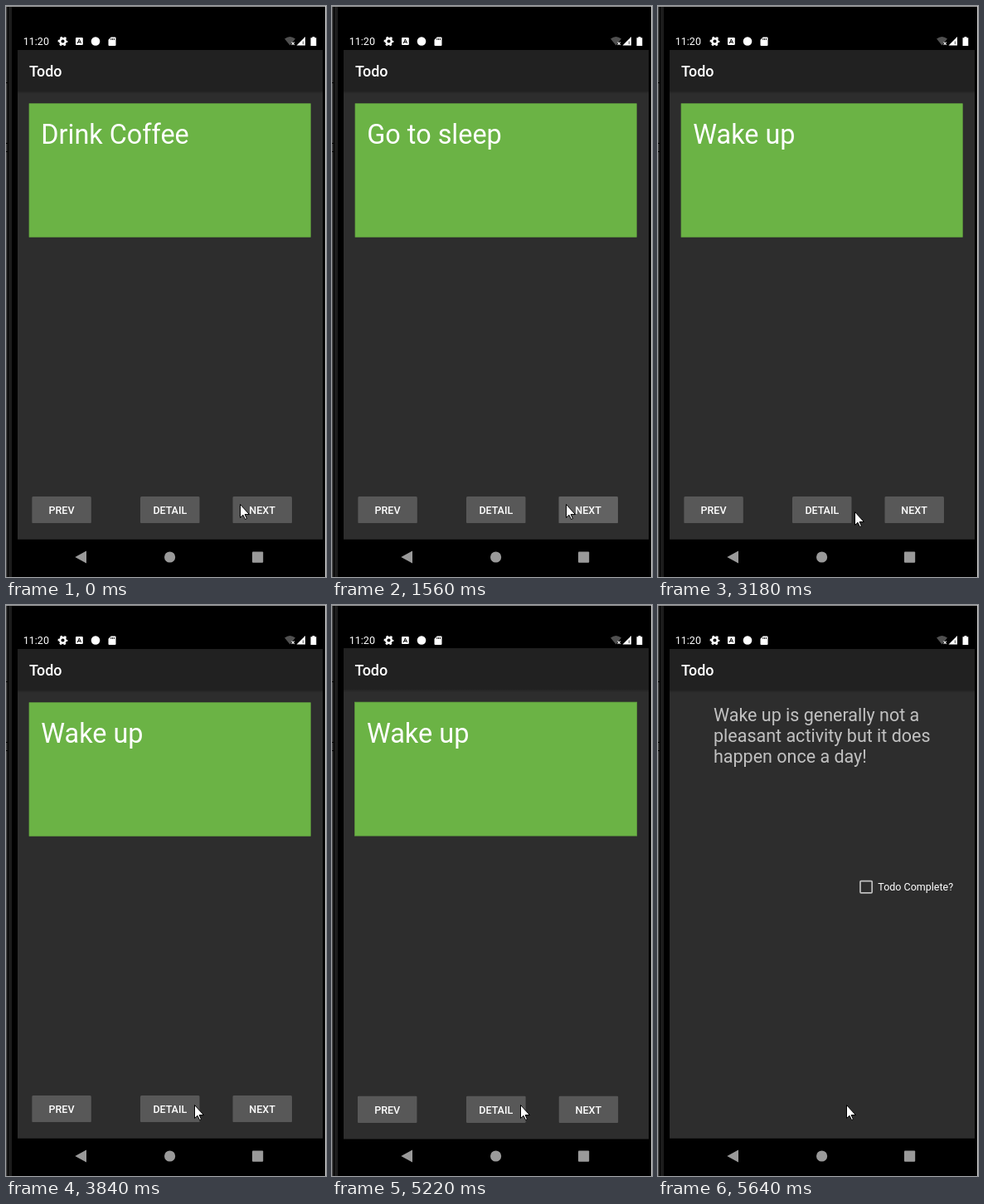
Animation, 386 px wide and 688 px high, one loop 8000 ms. Source, as an HTML page:

```html
<!DOCTYPE html>
<html lang="en">
<head>
<meta charset="utf-8">
<title>Todo</title>
<style>
  html, body { margin: 0; width: 100%; height: 100%; overflow: hidden; background: #000; }
  #stage { display: block; width: 386px; height: 688px; font-family: Roboto, sans-serif; fill: #fff; }
  .scale { transform-origin: 198px 359px; }
  .title { font-size: 17.9px; font-weight: 500; }
  .button { font-size: 12.5px; font-weight: 500; text-anchor: middle; }
  .small { font-size: 12.5px; }
  .task { font-size: 32.4px; }
  .detail { font-size: 21.5px; fill: #c1c1c1; }
</style>
</head>
<body>
<svg id="stage" viewBox="0 0 386 688">
  <defs>
    <linearGradient id="shade" x2="0" y2="1">
      <stop offset="0" stop-opacity=".2"/>
      <stop offset="1" stop-opacity="0"/>
    </linearGradient>
    <clipPath id="screen"><path d="M14 31H382V686H14z"/></clipPath>
    <g id="window">
      <path fill="#000" d="M14 31.5H382V686H14z"/>
      <path fill="#2d2d2d" d="M14 53H382V642.700H14z"/>
      <path fill="#212121" d="M14 53H382V102.700H14z"/>
      <path fill="url(#shade)" d="M14 102.700H382V106H14z"/>
      <text class="title" x="28" y="85.2">Todo</text>
    </g>
  </defs>

  <!-- phone body -->
  <rect width="386" height="688" fill="#000"/>
  <path fill="#444" d="M0 0h1.500V688H0z"/>
  <path fill="#1c1c1c" d="M3 0H7V688H3z"/>
  <path fill="#000" d="M0 92h3v1H0zM0 165h3v1H0zM0 175h3v1H0z"/>
  <path fill="#999" d="M0 0H386V1H0z"/>
  <path fill="#ccc" d="M385 0h1V688h-1z"/>

  <g clip-path="url(#screen)">
    <g id="list" class="scale">
      <use href="#window"/>
      <rect x="28" y="117.700" width="339.300" height="160.600" fill="#6bb345" stroke="#64a640" stroke-width=".7"/>
      <text id="task" class="task" x="42.3" y="166.3"></text>
      <g id="buttons"></g>
    </g>
    <g id="detail" class="scale">
      <use href="#window"/>
      <g class="detail">
        <text x="67" y="140.3">Wake up is generally not a</text>
        <text x="67" y="165.4">pleasant activity but it does</text>
        <text x="67" y="190.4">happen once a day!</text>
      </g>
      <rect x="244" y="332.600" width="14.200" height="14.200" rx="1" fill="none" stroke="#c0c0c0" stroke-width="1.7"/>
      <text class="small" x="265.3" y="344.2">Todo Complete?</text>
    </g>
  </g>

  <!-- status bar -->
  <text class="small" x="20.8" y="47.2">11:20</text>
  <g fill="none" stroke="#fff">
    <circle cx="68.5" cy="42.5" r="3.3" stroke-width="2.5"/>
    <circle cx="68.5" cy="42.5" r="5" stroke-width="1.8" stroke-dasharray="2.6 2.636" stroke-dashoffset="1.3"/>
  </g>
  <rect x="84" y="38" width="8.8" height="9" rx="1"/>
  <path d="M86.3 45l2.1-5 2.1 5M87 43.5h2.8" fill="none" stroke="#000"/>
  <circle cx="108" cy="42.5" r="5.3"/>
  <path d="M126.7 37.5h4.8q1 0 1 1v8.5q0 1-1 1h-7q-1 0-1-1v-6.3z"/>
  <path d="M126.8 39v2m1.8-2v2m1.8-2v2" stroke="#000" stroke-width=".9"/>
  <path fill="#505050" d="M336 39.5Q342.5 34.5 349 39.5L342.5 47.5z"/>
  <path d="M344.6 43.7l3.2 3.2m0-3.2l-3.2 3.2" stroke="#fff" stroke-width="1.1"/>
  <path d="M361 37V47.5H350.5z"/>
  <path fill="#000" d="M357.500 42.500h2v3.500h-2z" opacity=".4"/>
  <path d="M369.5 37h2.8v1.2h2v9.800h-6.800v-9.800h2z"/>

  <!-- navigation bar -->
  <g fill="#9a9a9a">
    <path d="M83.300 664L97 656.500V671.500z"/>
    <circle cx="197.600" cy="664" r="6.600"/>
    <rect x="297" y="657.500" width="13.200" height="13.200" rx="1"/>
  </g>

  <path id="cursor" d="M.5 .5v16l3.500-3.200 2.500 5.200 2-.9-2.400-5h5.400z" stroke="#000" stroke-linejoin="round"/>
</svg>
<script>
const $ = id => document.getElementById(id);

// Nested svg clips the ripple to the button.
$('buttons').innerHTML = ['PREV', 'DETAIL', 'NEXT'].map((label, i) => `
  <svg x="${[31.2, 162, 273.3][i]}" y="591" width="71.7" height="32.3">
    <rect width="71.7" height="32.3" rx="1.5" fill="#585858"/>
    <circle id="${label}" cx="${[0, 64, 15][i]}" cy="14" opacity=".06"/>
    <text class="button" x="35.8" y="21">${label}</text>
  </svg>`).join('');

const tasks = [[0, 'Drink Coffee'], [1170, 'Eat Lunch'], [1440, 'Go to sleep'], [2230, 'Wake up']];

const clamp = v => Math.max(0, Math.min(1, v));
// Progress from 0 to 1 in n held steps.
const stepped = (t, start, span, n) => clamp(Math.floor((t - start) * n / span) / n);

// Growing ripple radius while a press lasts.
const ripple = (t, start, end) =>
  t < start || t >= end ? 0 : 28 + 68 * stepped(t, start, 240, 2);

function draw(now) {
  const t = now % 8000;
  $('task').textContent = tasks.findLast(([start]) => start <= t)[1];
  $('NEXT').setAttribute('r', ripple(t, 900, 1290) + ripple(t, 1290, 2500));
  $('DETAIL').setAttribute('r', ripple(t, 4560, 4980));

  // A quick move left, then a slow curve up to the button.
  const jump = stepped(t, 2940, 240, 2), drift = stepped(t, 3180, 660, 5);
  const x = 282 - 45 * jump - 10 * drift - 36 * drift * (1 - drift);
  const y = 600 + 9 * jump - 7 * drift;
  $('cursor').setAttribute('transform', `translate(${Math.round(x)} ${Math.round(y)})`);

  // Both screens grow while the detail screen fades in.
  const u = stepped(t, 5100, 480, 4);
  const p = u ** 3 / (u ** 3 + 2.2 * (1 - u) ** 3);
  const alpha = clamp((p - .1) * 2.5);
  $('list').style.transform = `scale(${1 + .15 * p})`;
  $('list').style.opacity = alpha < 1 ? 1 : 0;
  $('detail').style.transform = `scale(${.85 + .15 * p})`;
  $('detail').style.opacity = alpha;

  requestAnimationFrame(draw);
}
draw(0);
</script>
</body>
</html>
```
